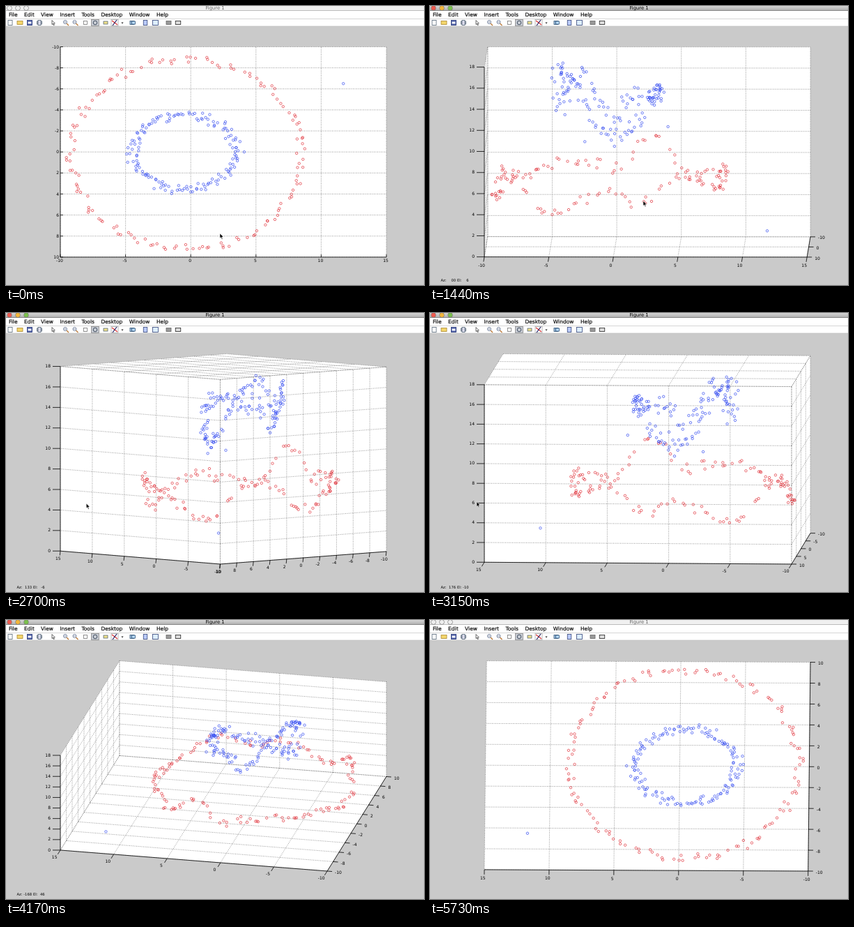
An HTML page with a canvas for the animation above (5760 ms loop, 600 by 400 pixels).

```html
<!DOCTYPE html>
<html lang="en">
<head>
<meta charset="utf-8">
<title>Figure 1</title>
<style>
  html, body { margin: 0; width: 100%; height: 100%; overflow: hidden; background: #cacaca; }
  canvas, header, nav { position: absolute; left: 0; top: 0; }
  header, nav { width: 600px; font-family: "DejaVu Sans", sans-serif; color: #000; }
  header { height: 6px; font-size: 6.8px; line-height: 6px; text-align: center;
    background: linear-gradient(#d6d6d6, #b2b2b2); border-bottom: 1px solid #888; }
  header.idle { background: #f0f0f0; color: #666; border-color: #bbb; }
  nav { top: 7px; height: 11px; display: flex; gap: 9.5px; padding-left: 4px; box-sizing: border-box;
    background: #fff; font-size: 7.5px; line-height: 11.5px; -webkit-text-stroke: .15px #000; }
</style>
</head>
<body>
<canvas id="plot" width="600" height="400"></canvas>
<header id="bar">Figure 1</header>
<nav><span>File</span><span>Edit</span><span>View</span><span>Insert</span><span>Tools</span>
  <span>Desktop</span><span>Window</span><span>Help</span></nav>
<script>
const LOOP = 5760, STEP = 30, TAU = Math.PI * 2, RAD = Math.PI / 180;
const BOX = { l: 78, r: 546, t: 58.5, b: 360 };
const bar = document.getElementById('bar');
const ctx = document.getElementById('plot').getContext('2d');

// time, azimuth, elevation
const VIEWS = [
  [90, 0, 90], [930, 2, 48], [1440, 0.6, 6.1], [2160, 61.2, 2],
  [3150, 176.5, -9.9], [4170, 192.5, 45.6], [5350, 180.4, 90]
];

// Peaks and dips around each ring: degrees, height
const RED_TURNS = [
  [18, 5.8], [55, 7.5], [75, 5.1], [90, 6.1], [120, 3.9], [152, 7.8], [190, 4.7],
  [215, 6.4], [257, 7.5], [270, 6.6], [292, 9.8], [312, 6.2], [350, 7.1]
];
const BLUE_TURNS = [
  [10, 14.8], [80, 11.3], [165, 17.2], [195, 13.5], [240, 15.8], [272, 12.4], [305, 14.3]
];
const STRAYS = [[11.7, -6.5, 0.9], [-2.3, 3.4, 10.3], [0, 3.8, 9.9], [4.1, 0, 11.4]];

const AXES = [
  { lo: -10, hi: 15, steps: [5, 10, 25] },
  { lo: -10, hi: 10, steps: [2, 5, 10, 20], flip: true },
  { lo: 0, hi: 18, steps: [2, 5, 10, 18] }
];

function random(seed) {
  return () => {
    seed = (seed + 0x6D2B79F5) | 0;
    let r = Math.imul(seed ^ (seed >>> 15), 1 | seed);
    r = (r + Math.imul(r ^ (r >>> 7), 61 | r)) ^ r;
    return ((r ^ (r >>> 14)) >>> 0) / 4294967296;
  };
}

function heightAt(turns, deg) {
  const n = turns.length, i = turns.findIndex(p => p[0] > deg);
  const [b, zb] = turns[Math.max(i, 0)], [a, za] = turns[(i > 0 ? i : n) - 1];
  const s = ((deg - a + 360) % 360) / ((b - a + 360) % 360);
  return za + (zb - za) * (1 - Math.cos(Math.PI * s)) / 2;
}

function ring(o) {
  const rnd = random(o.seed), spread = () => rnd() + rnd() - 1;
  return Array.from({ length: o.count }, (_, i) => {
    const deg = (360 * (i + rnd() * 2.5) / o.count) % 360;
    const d = spread() * o.fuzz;
    return [o.cx + (o.rx + d) * Math.cos(deg * RAD), o.cy + (o.ry + d) * Math.sin(deg * RAD),
      heightAt(o.turns, deg) + spread() * o.lift];
  });
}
const red = ring({ seed: 11, count: 146, cx: -0.35, cy: 0.2, rx: 8.9, ry: 9.05, fuzz: 0.5, lift: 0.7, turns: RED_TURNS });
const blue = ring({ seed: 5, count: 150, cx: -0.55, cy: 0, rx: 3.95, ry: 3.55, fuzz: 0.6, lift: 1.3, turns: BLUE_TURNS }).concat(STRAYS);

// Monotone cubic through column c of VIEWS
function track(c, t) {
  const last = VIEWS.length - 1;
  if (t <= VIEWS[0][0]) return VIEWS[0][c];
  if (t >= VIEWS[last][0]) return VIEWS[last][c];
  const slope = i => (VIEWS[i + 1][c] - VIEWS[i][c]) / (VIEWS[i + 1][0] - VIEWS[i][0]);
  const tangent = i => {
    if (i === 0 || i === last) return slope(i ? i - 1 : 0);
    const p = slope(i - 1), q = slope(i);
    return p * q <= 0 ? 0 : 2 * p * q / (p + q);
  };
  const i = VIEWS.findIndex(k => k[0] > t) - 1;
  const h = VIEWS[i + 1][0] - VIEWS[i][0], s = (t - VIEWS[i][0]) / h, r = 1 - s;
  return VIEWS[i][c] * (1 + 2 * s) * r * r + VIEWS[i + 1][c] * s * s * (3 - 2 * s)
    + h * (tangent(i) * s * r * r - tangent(i + 1) * s * s * r);
}

// Orthographic view of the unit cube, stretched to fill BOX
function camera(az, el) {
  const sa = Math.sin(az * RAD), ca = Math.cos(az * RAD);
  const se = Math.sin(el * RAD), ce = Math.cos(el * RAD);
  const U = [ca, sa, 0], V = [-sa * se, ca * se, ce];
  const sum = (w, f) => w.reduce((s, n) => s + f(n, 0), 0);
  const dot = (w, p) => w[0] * p[0] + w[1] * p[1] + w[2] * p[2];
  const fit = (w, p) => (dot(w, p) - sum(w, Math.min)) / (sum(w, Math.max) - sum(w, Math.min));
  return {
    U, V, ce,
    far: [sa < 0 ? 1 : 0, ca > 0 ? 1 : 0, el > 0 ? 0 : 1],
    at: p => [BOX.l + fit(U, p) * (BOX.r - BOX.l), BOX.b - fit(V, p) * (BOX.b - BOX.t)]
  };
}

const unit = (k, v) => {
  const a = AXES[k], n = (v - a.lo) / (a.hi - a.lo);
  return a.flip ? 1 - n : n;
};

// Cube point with axis k at v, axis m at w, the third at 0
const spot = (k, v, m, w) => {
  const p = [0, 0, 0];
  p[k] = v;
  p[m] = w;
  return p;
};

function line(p, q) {
  ctx.beginPath();
  ctx.moveTo(...p);
  ctx.lineTo(...q);
  ctx.stroke();
}

function shape(points, fill) {
  ctx.beginPath();
  points.forEach(p => ctx.lineTo(...p));
  ctx.closePath();
  ctx.fillStyle = fill;
  ctx.fill();
}

function circle(x, y, r) {
  ctx.beginPath();
  ctx.arc(x, y, r, 0, TAU);
  ctx.stroke();
}

function label(text, x, y, align) {
  ctx.textAlign = align;
  ctx.fillText(text, x, y);
}

function ticks(k, cam) {
  const a = AXES[k], p = cam.at([0, 0, 0]), q = cam.at(spot(k, 1, k, 1));
  const len = Math.hypot(q[0] - p[0], q[1] - p[1]);
  const step = a.steps.find(s => len * s / (a.hi - a.lo) > 11);
  const out = [];
  if (step) for (let v = Math.ceil(a.lo / step) * step; v <= a.hi; v += step) out.push(v);
  return out;
}

function panes(cam, marks) {
  for (let n = 0; n < 3; n++) {
    const i = (n + 1) % 3, j = (n + 2) % 3;
    shape([[0, 0], [1, 0], [1, 1], [0, 1]].map(([a, b]) => {
      const p = spot(i, a, j, b);
      p[n] = cam.far[n];
      return cam.at(p);
    }), '#fff');
  }
  ctx.strokeStyle = '#666';
  ctx.lineWidth = 0.7;
  ctx.setLineDash([1, 1.5]);
  for (let k = 0; k < 3; k++) for (let m = 0; m < 3; m++) {
    if (m === k) continue;
    for (const v of marks[k]) {
      const p = spot(k, unit(k, v), m, cam.far[m]), q = p.slice();
      q[3 - k - m] = 1;
      line(cam.at(p), cam.at(q));
    }
  }
  ctx.setLineDash([]);
}

function rulers(cam, marks, flat) {
  ctx.strokeStyle = ctx.fillStyle = '#000';
  ctx.lineWidth = 0.8;
  ctx.font = '6px "DejaVu Sans", sans-serif';
  ctx.textBaseline = 'middle';
  const low = [!flat && cam.V[0] < 0 ? 1 : 0, cam.V[1] < 0 ? 1 : 0];

  for (let k = 0; k < 2; k++) {
    const m = 1 - k, end = v => cam.at(spot(k, v, m, low[m]));
    const a = end(0), b = end(1), inner = cam.at(spot(k, 0, m, 1 - low[m]));
    line(a, b);
    const d = Math.hypot(a[0] - inner[0], a[1] - inner[1]);
    let dx = (a[0] - inner[0]) / d, dy = (a[1] - inner[1]) / d;
    const level = Math.abs(b[0] - a[0]) > Math.abs(b[1] - a[1]);
    if (level && dy < 0.5) [dx, dy] = [-0.1, 0.9];
    for (const v of marks[k]) {
      const [x, y] = end(unit(k, v)), tick = flat ? -4 : 7;
      line([x, y], [x + dx * tick, y + dy * tick]);
      if (flat && k) label(v, x - 2, y + 0.5, 'right');
      else if (flat) label(v, x - 1, y + 5, 'center');
      else if (level) label(v, x + dx * 12 - 2, y + dy * 12.5, 'center');
      else label(v, x + dx * 11, y + dy * 11 + 2, 'left');
    }
  }

  if (cam.ce < 0.05) return;
  const left = z => cam.at([cam.U[0] < 0 ? 1 : 0, cam.U[1] < 0 ? 1 : 0, z]);
  line(left(0), left(1));
  for (const v of marks[2]) {
    const [x, y] = left(unit(2, v));
    line([x, y], [x - 11, y]);
    label(v, x - 14, y, 'right');
  }
}

function dots(list, colour, cam) {
  ctx.strokeStyle = colour;
  ctx.lineWidth = 0.7;
  for (const p of list) circle(...cam.at(p.map((v, k) => unit(k, v))), 1.7);
}

function icon(x, w, h, fill, edge = '#567') {
  ctx.fillStyle = fill;
  ctx.strokeStyle = edge;
  ctx.lineWidth = 0.8;
  ctx.fillRect(x - w / 2, 24 - h / 2, w, h);
  ctx.strokeRect(x - w / 2, 24 - h / 2, w, h);
}

function arrow(x, y, s, fill) {
  const half = [[0, 0], [0, 7.5], [1.7, 6], [3, 9], [4.2, 8.4], [3, 5.6], [5.3, 5.4]];
  shape(half.map(([dx, dy]) => [x + dx * s, y + dy * s]), fill);
  ctx.lineWidth = 0.6;
  ctx.stroke();
}

function toolbar() {
  ctx.fillStyle = '#fff';
  ctx.fillRect(0, 7, 600, 22);
  ctx.strokeStyle = '#bbb';
  ctx.lineWidth = 0.6;
  for (const y of [18.5, 29]) line([0, y], [600, y]);
  icon(6, 6, 7, '#fff');
  icon(20, 8, 5, '#f3d66c', '#a83');
  icon(34, 7, 7, '#56a', '#237');
  icon(34, 4, 2, '#fff', '#fff');
  icon(48, 7, 4, '#bbc');
  icon(48, 4, 7, '#dde');
  ctx.strokeStyle = '#000';
  arrow(66, 20.5, 0.8, '#fff');
  for (const x of [85, 98.5]) {
    ctx.strokeStyle = '#b73';
    ctx.lineWidth = 1.3;
    line([x + 2, 25], [x + 5, 28]);
    ctx.strokeStyle = '#568';
    ctx.lineWidth = 0.8;
    circle(x, 23, 2.5);
    line([x - 1.2, 23], [x + 1.2, 23]);
  }
  icon(114, 5, 5, '#fff', '#777');
  icon(128, 11, 9, '#c8ccd4', '#888');
  ctx.strokeStyle = '#234';
  circle(128, 24, 2.8);
  icon(143, 6, 4, '#f0e18a');
  icon(156, 10, 9, '#fff', '#aaa');
  ctx.lineWidth = 1.2;
  ctx.strokeStyle = '#d33';
  line([152, 21], [160, 27]);
  ctx.strokeStyle = '#226';
  line([153, 28], [159, 20]);
  icon(181, 6, 5, '#9bd', '#357');
  icon(183, 5, 4, '#bdf', '#357');
  icon(200, 5.5, 7, '#bcf', '#347');
  icon(214.5, 8, 7, '#def', '#347');
  icon(233.5, 7, 5, '#999', '#666');
  icon(247, 7.5, 5, '#ddd', '#222');
  for (const [x, y] of [[167, 23.5], [598.5, 12]]) shape([[x - 1.6, y], [x + 1.6, y], [x, y + 2]], '#222');
}

// Window buttons sit above the title bar's background
const lamps = ['#ee5a4e', '#f3b63a', '#7ac04c'].map((colour, i) => {
  const el = document.createElement('i');
  el.style.cssText = `position:absolute;left:${1.5 + i * 12}px;top:-.5px;width:6px;height:6px;`
    + 'border-radius:50%;box-shadow:0 0 0 .6px #777';
  bar.append(el);
  return { el, colour };
});

function draw(t) {
  const az = track(1, t), el = track(2, t), cam = camera(az, el);
  const idle = t < 90 || t >= 5640;
  bar.className = idle ? 'idle' : '';
  for (const lamp of lamps) lamp.el.style.background = idle ? '#eee' : lamp.colour;

  ctx.fillStyle = '#cacaca';
  ctx.fillRect(0, 0, 600, 400);
  toolbar();
  const marks = [0, 1, 2].map(k => ticks(k, cam));
  panes(cam, marks);
  rulers(cam, marks, az === 0);
  dots(red, '#e03038', cam);
  dots(blue, '#3048f0', cam);

  if (t > 90 && t < 5350) {
    ctx.fillStyle = '#000';
    ctx.font = '5.2px "DejaVu Sans", sans-serif';
    const turn = Math.floor(az > 180 ? az - 360 : az);
    label('Az:', 15.5, 394, 'left');
    label(String(turn).padStart(2, '0'), 37, 394, 'right');
    label('El:', 39, 394, 'left');
    label(Math.round(el), 55.5, 394, 'right');
  }
  // The drag that turns the view; the pointer then leaves the stage
  if (t < 3500) {
    ctx.strokeStyle = '#fff';
    arrow(307 - 1.66 * az + 0.0017 * az * az, 276 + 0.555 * el, 0.95, '#000');
  }
}

const start = performance.now();
function tick() {
  const t = (performance.now() - start) % LOOP;
  draw(Math.floor(t / STEP) * STEP);
  requestAnimationFrame(tick);
}
tick();
</script>
</body>
</html>
```
